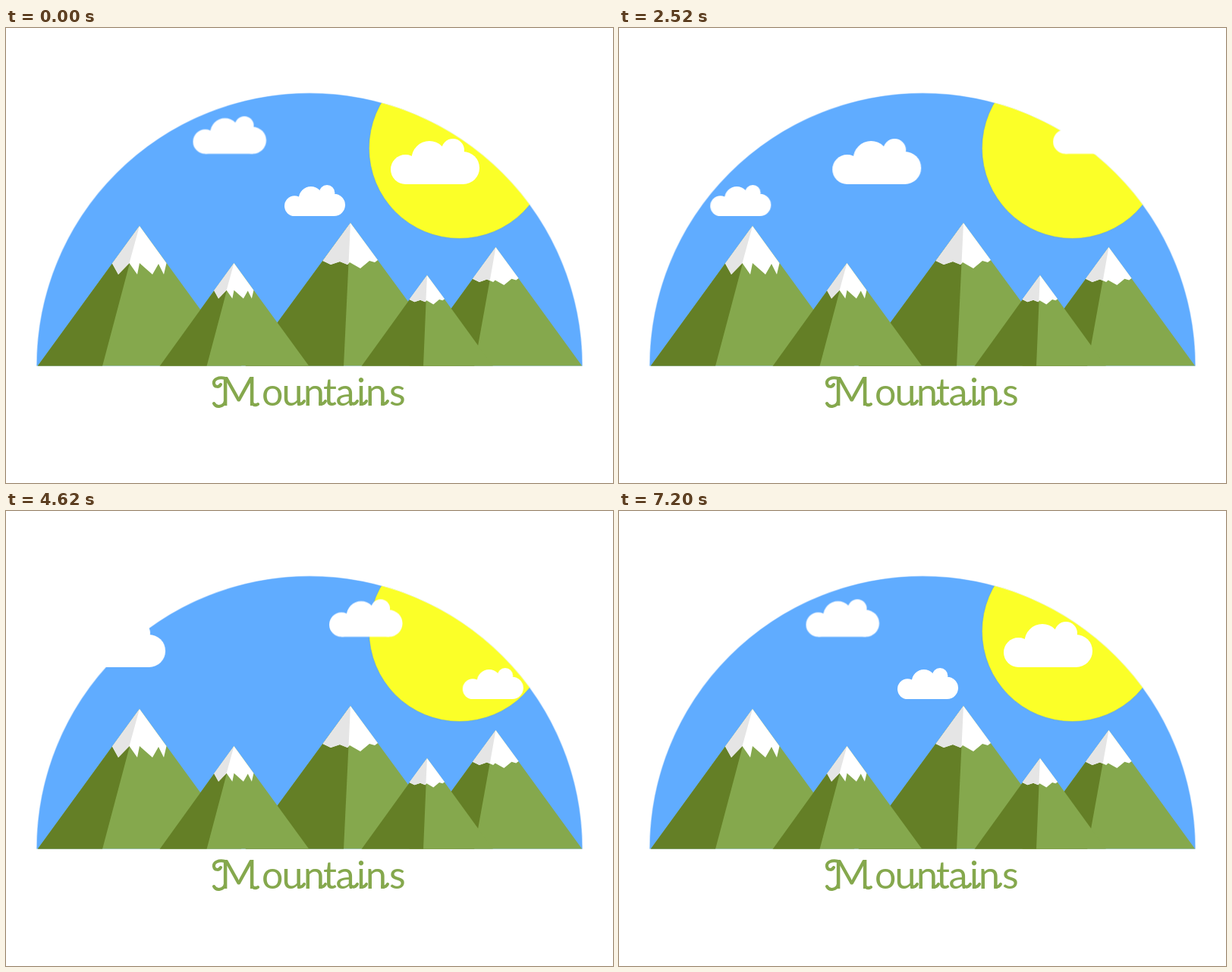
Recreate the animation shown at these times as an HTML page without scripts. Size 800 px wide and 600 px high, loop 7.23 s.

```html
<!DOCTYPE html>
<html lang="en">
<head>
<meta charset="utf-8">
<title>Mountains</title>
<style>
html, body { margin: 0; width: 100%; height: 100%; overflow: hidden; background: #fff; }
svg { display: block; width: 800px; height: 600px; }

.sky { fill: #60acff; }
.sun { fill: #fbff28; stroke: #5a9ac8; stroke-width: .8; stroke-opacity: .5; }
.rim { fill: none; stroke: #fff; stroke-width: 1.6; stroke-opacity: .5; }
.lit { fill: #85a84d; }
.dark { fill: #647f26; }
.snow, .cloud { fill: #fff; }
.shade { fill: #e5e5e5; }
.word { font: 50px Lato, "Open Sans", sans-serif; fill: #85a84d; }
.cap { font-size: 53px; }
.swash { fill: none; stroke: #85a84d; stroke-width: 4; stroke-linecap: round; }

/* Each cloud leaves on the left, then re-enters on the right; 30 ms per step. */
.cloud { animation: 7230ms -2ms infinite; }
.high { animation-name: high; }
.big { animation-name: big; }
.low { animation-name: low; }

@keyframes high {
  0% { transform: translateX(0); animation-timing-function: steps(61); }
  25.311% { transform: translateX(-164.2px); }
  25.312% { transform: translateX(373.7px); animation-timing-function: steps(179); }
  99.585%, 100% { transform: translateX(0); }
}
@keyframes big {
  0% { transform: translateX(0); animation-timing-function: steps(180); }
  74.689% { transform: translateX(-483.8px); }
  74.69% { transform: translateX(153.4px); animation-timing-function: steps(60); }
  99.585%, 100% { transform: translateX(0); }
}
@keyframes low {
  0% { transform: translateX(0); animation-timing-function: steps(118); }
  48.963% { transform: translateX(-346.6px); }
  48.964% { transform: translateX(333.1px); animation-timing-function: steps(122); }
  99.585%, 100% { transform: translateX(0); }
}
</style>
</head>
<body>
<svg viewBox="0 0 800 600">
  <defs>
    <path id="dome" d="M40 445.5A360 360 0 0 1 760 445.5Z"/>
    <clipPath id="inside"><use href="#dome"/></clipPath>
    <g id="puff">
      <circle cx="19.5" cy="40.5" r="19.5"/>
      <circle cx="51" cy="26.5" r="23.5"/>
      <circle cx="82" cy="15" r="15"/>
      <circle cx="95.5" cy="38.5" r="21.5"/>
      <path d="M19.5 40H32V22H95.5V60H19.5Z"/>
    </g>
    <!-- Snow caps hang from the summit at 0,0 -->
    <g id="jagged">
      <path class="snow" d="M0 0L35.5 49 32 64 25 50 17 64 0 49 -3 64 -13.5 49 -28 64 -36 49.5Z"/>
      <path class="shade" d="M0 0L-13.5 49 -28 64 -36 49.5Z"/>
    </g>
    <path id="wavy" class="snow" d="M0 0L36 49 32 52 25 50 13 60 -1 52 -4 55 -14 51 -26 55 -36.5 50Z"/>
    <path id="steep" class="shade" d="M0 0L-2.5 53.5 -4 55 -14 51 -26 55 -36.5 50Z"/>
    <path id="slanted" class="shade" d="M0 0L-9.3 52.8 -14 51 -26 55 -36.5 50Z"/>
  </defs>

  <use href="#dome" class="sky"/>
  <circle class="sun" cx="597.5" cy="158.5" r="119" clip-path="url(#inside)"/>

  <g clip-path="url(#inside)">
    <path class="lit" d="M645.5 289L759.5 446H531.5Z"/>
    <path class="dark" d="M645.5 289L617.2 446H531.5Z"/>
    <g transform="translate(645.5 289) scale(.835)"><use href="#wavy"/><use href="#slanted"/></g>

    <path class="lit" d="M454 257L592.5 446H315.5Z"/>
    <path class="dark" d="M454 257L445 446H315.5Z"/>
    <g transform="translate(454 257)"><use href="#wavy"/><use href="#steep"/></g>

    <path class="lit" d="M176 261L310.500 446H41.500Z"/>
    <path class="dark" d="M176 261L127 446H41.500Z"/>
    <use href="#jagged" transform="translate(176 261)"/>

    <path class="lit" d="M300.500 310L399.500 446H202.500Z"/>
    <path class="dark" d="M300.500 310L264.500 446H202.500Z"/>
    <use href="#jagged" transform="translate(300.500 310) scale(.73)"/>

    <path class="lit" d="M555 326L642 446H468.500Z"/>
    <path class="dark" d="M555 326L550 446H468.500Z"/>
    <g transform="translate(555 326) scale(.64)"><use href="#wavy"/><use href="#steep"/></g>
  </g>

  <g class="cloud high"><use href="#puff" transform="translate(246.500 116.400) scale(.825)"/></g>
  <g class="cloud big"><use href="#puff" transform="translate(507 146)"/></g>
  <g class="cloud low"><use href="#puff" transform="translate(367 207) scale(.684)"/></g>
  <path class="rim" d="M40 445.500A360 360 0 0 1 760 445.500"/>

  <text class="word" y="498" x="282 337 363.500 392 418 434.500 462 474 505"><tspan class="cap">M</tspan>ountains</text>
  <path class="swash" d="M289 462C280 460 273 463 274 469 275 474 281 474 283 470M289 492C287 500 277 501 274 495M324 494Q327 499 332 496"/>
  <path class="swash" d="M386 495q4 2 7-3M414 495q4 2 7-3M456 495q4 2 7-3M468 495q4 2 7-3M496 495q4 2 7-3"/>
</svg>
</body>
</html>
```
